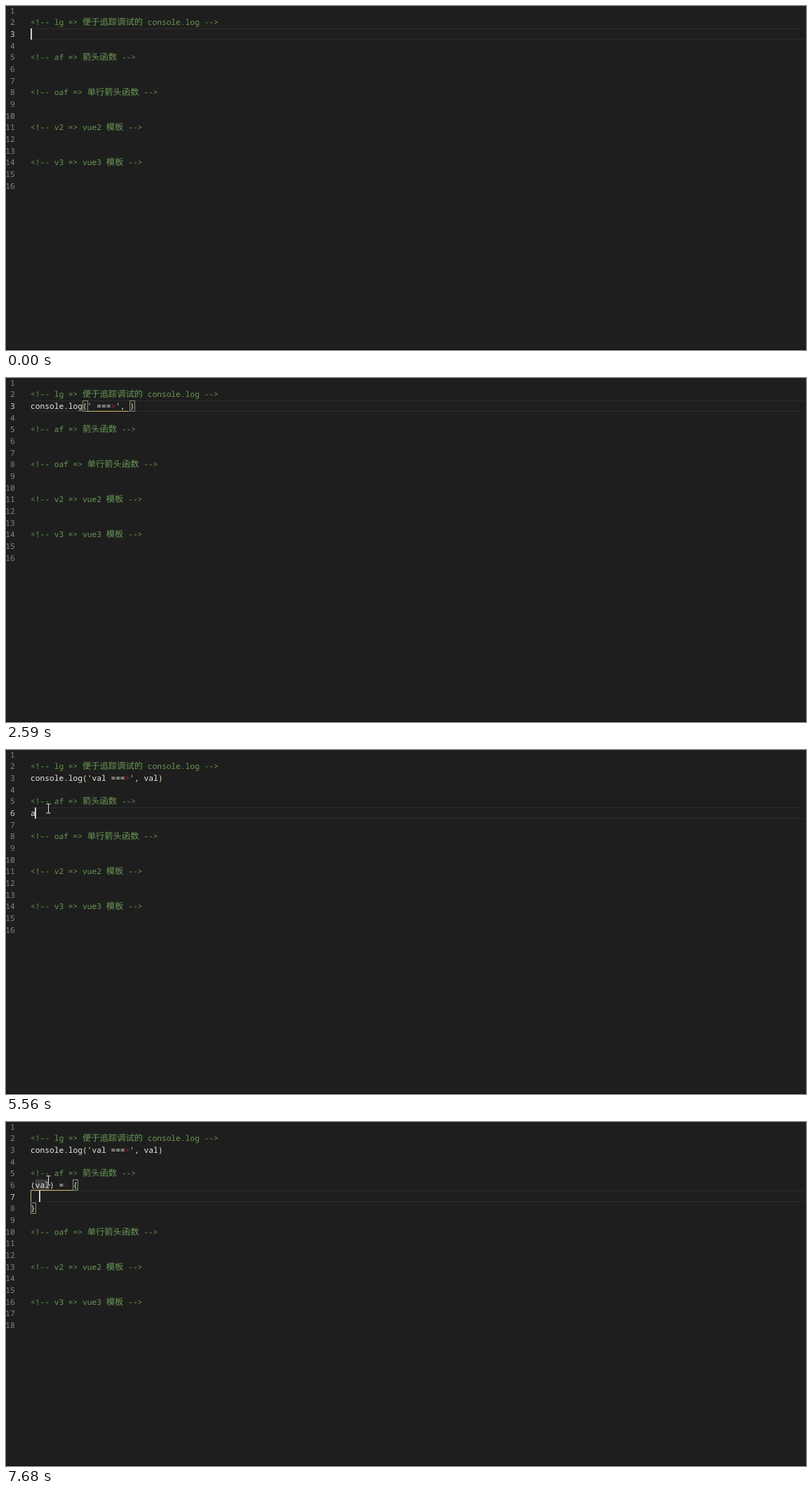
An HTML page with a canvas that plays this animation: 1140 by 491 pixels, repeating every 8 s.

```html
<!DOCTYPE html>
<html lang="zh">
<head>
<meta charset="utf-8">
<title>Editor snippets</title>
<style>
  html, body { margin: 0; height: 100%; overflow: hidden; background: #1e1e1e; }
  canvas { display: block; }
</style>
</head>
<body>
<canvas width="1140" height="491"></canvas>
<script>
const ctx = document.querySelector('canvas').getContext('2d');
ctx.textRendering = 'geometricPrecision';

const LOOP = 8000;
const LEFT = 35, CELL = 6.73, WIDE = 12.28, ROW = 16.667;
const POPUP_W = 379, DETAILS_W = 291;
const MONO = '"Noto Sans Mono", "DejaVu Sans Mono", monospace';
const HAN = '"Noto Sans CJK SC", "Noto Sans CJK", sans-serif';
const COLOR = {
  back: '#1e1e1e', text: '#ececE4', comment: '#6a9955', number: '#858585', active: '#d0d0d0',
  bracket: '#ece6b4', guide: '#c9b766', panel: '#252526', edge: '#454545',
  selected: '#04395e', match: '#2aaaff', hint: '#a4a4a4'
};

const lineTop = line => Math.floor(line * ROW - 18);
const baseline = line => Math.round(line * ROW - 6);
const colX = col => LEFT + col * CELL;

const logCall = word => `console.log('${word} ===>', ${word})`;
const arrow = word => [`(${word}) => {`, '', '}'];

const logList = { items: ['lg', 'leg', 'legend'], hint: 'Console log', typed: 'lg' };
const logDetails = {
  head: ['便于追踪调试的 console.log (全局用户代码', '片段)'],
  code: ["console.log(' ===>', )"]
};
const arrowDetails = { head: ['箭头函数 (全局用户代码片段)'], code: ['() => {', '', '}'] };
const longList = (words, typed, hint) => ({ items: words.split(' '), typed, hint });

// Each step changes part of the editor state from its time on.
const steps = [
  [0, { log: '', arrow: [''], line: 3, carets: [[3, 0]], on: true, boxes: [],
        guide: null, popup: null, details: null, word: null, click: false }],
  [230, { on: false }],
  [670, { on: true }],
  [1160, { log: 'l', carets: [[3, 1]] }],
  [1250, { log: 'lg', carets: [[3, 2]] }],
  [1340, { popup: longList('lg label legend li link leg lang list loop low last long', 'l', 'Console log') }],
  [1430, { popup: logList }],
  [1520, { details: logDetails }],
  [1940, { on: false }],
  [2090, { log: logCall(''), carets: [[3, 13], [3, 21]], on: true, popup: null, details: null }],
  [2150, { boxes: [[3, 11], [3, 21]], guide: [3, 12, 21] }],
  [2590, { on: false }],
  [2660, { log: logCall('v'), carets: [[3, 14], [3, 23]], on: true, boxes: [[3, 11], [3, 23]], guide: [3, 12, 23] }],
  [2720, { log: logCall('va'), carets: [[3, 15], [3, 25]], boxes: [[3, 11], [3, 25]], guide: [3, 12, 25] }],
  [2780, { popup: longList('var video v2 v3 vue2 vue3', 'v') }],
  [2840, { log: logCall('val'), carets: [[3, 16], [3, 27]], boxes: [[3, 11], [3, 27]], guide: [3, 12, 27], popup: null }],
  [3190, { carets: [[3, 28]], guide: null }],
  [3630, { on: false }],
  [4130, { on: true }],
  [4630, { on: false }],
  [5010, { line: 6, carets: [[6, 0]], on: true, click: true }],
  [5070, { boxes: [] }],
  [5220, { click: false }],
  [5490, { arrow: ['a'], carets: [[6, 1]] }],
  [5580, { arrow: ['af'], carets: [[6, 2]] }],
  [5660, { popup: longList('af a abbr address area article aside audio alt app async auto', 'a', 'Arrow function') }],
  [5750, { popup: { items: ['af'], hint: 'Arrow function', typed: 'af' }, details: arrowDetails }],
  [6170, { on: false }],
  [6430, { arrow: arrow(''), carets: [[6, 1]], on: true, boxes: [[6, 0], [6, 1]], popup: null, details: null }],
  [6910, { on: false }],
  [7230, { arrow: arrow('va'), carets: [[6, 3]], on: true, boxes: [[6, 0], [6, 3]] }],
  [7310, { arrow: arrow('val'), carets: [[6, 4]], boxes: [[6, 0], [6, 4]],
           popup: longList('val var video v2 v3 vue2 vue3', 'v') }],
  [7400, { popup: longList('val var', 'va') }],
  [7600, { line: 7, carets: [[7, 2]], boxes: [], popup: null, word: [6, 1, 4] }],
  [7680, { boxes: [[6, 9], [8, 0]], guide: [6, 0, 9, 7] }]
];

function rect(x, y, w, h, color) {
  ctx.fillStyle = color;
  ctx.fillRect(x, y, w, h);
}

function frame(x, y, w, h, fill, edge) {
  rect(x, y, w, h, fill);
  ctx.strokeStyle = edge;
  ctx.lineWidth = 1;
  ctx.strokeRect(x + .5, y + .5, w - 1, h - 1);
}

// Draws on the monospace grid; color is a string or a function of (char, index).
function drawText(text, x, y, color, scale = 1, weight = 500) {
  [...text].forEach((char, i) => {
    const wide = char > '\u2e80';
    ctx.font = `${wide ? 300 : weight} ${(wide ? 12.3 : 11.2) * scale}px ${wide ? HAN : MONO}`;
    ctx.fillStyle = typeof color === 'string' ? color : color(char, i);
    ctx.fillText(char, x, y);
    x += (wide ? WIDE : CELL) * scale;
  });
}

const codeColor = arrowColor => char =>
  '(){}'.includes(char) ? COLOR.bracket : char === '>' ? arrowColor : COLOR.text;

function drawLines(state) {
  const note = text => `<!-- ${text} -->`;
  const lines = ['', note('lg => 便于追踪调试的 console.log'), state.log, '',
    note('af => 箭头函数'), ...state.arrow, '', note('oaf => 单行箭头函数'), '', '',
    note('v2 => vue2 模板'), '', '', note('v3 => vue3 模板'), '', ''];
  lines.forEach((text, i) => {
    const line = i + 1, y = baseline(line), label = String(line);
    drawText(label, 12.8 - label.length * CELL, y, line === state.line ? COLOR.active : COLOR.number);
    const color = text.startsWith('<!--') ? COLOR.comment : codeColor(line === 3 ? '#c02020' : '#4a2020');
    drawText(text, LEFT, y, color);
  });
}

function drawMarks({ line, boxes, word, guide }) {
  const top = lineTop(line);
  rect(37, top, 1101, 1, '#2c2c2c');
  rect(37, top + 15, 1101, 1, '#2c2c2c');
  if (word) {
    const [row, from, to] = word;
    rect(colX(from), lineTop(row), (to - from) * CELL, 15, '#3b3d40');
  }
  for (const [row, col] of boxes)
    frame(Math.floor(colX(col)), lineTop(row), 8, 16, '#1c261c', '#888888');
  if (guide) {
    const [row, from, to, last] = guide;
    const y = lineTop(row) + 15;
    rect(Math.floor(colX(from)), y, Math.floor((to - from) * CELL), 1, COLOR.guide);
    if (last) rect(LEFT, y + 1, 1, lineTop(last) + 15 - y, COLOR.guide);
  }
}

function drawPopup({ popup, details, carets }) {
  const [line, col] = carets[0];
  const x = Math.floor(colX(col)), y = lineTop(line) + 16;
  frame(x, y, POPUP_W, Math.round(popup.items.length * ROW + 3.6), COLOR.panel, COLOR.edge);
  rect(x + 1, y + 1, POPUP_W - 2, 17, COLOR.selected);
  popup.items.forEach((item, i) => {
    const base = Math.round(y + 13.3 + i * ROW);
    ctx.strokeStyle = COLOR.text;
    ctx.lineWidth = 1;
    ctx.strokeRect(x + 4.5, base - 8.5, 11, 10);
    const matched = (char, at) => popup.typed.includes(char) && item.indexOf(char) === at;
    drawText(item, x + 21, base, (char, at) => matched(char, at) ? COLOR.match : COLOR.text, 1, 600);
  });
  if (popup.hint) {
    const scale = .865;
    drawText(popup.hint, x + 370 - popup.hint.length * CELL * scale, y + 13, '#c4cdd4', scale, 600);
  }
  if (details) drawDetails(details, x + POPUP_W - 1, y);
}

function drawDetails({ head, code }, x, y) {
  const rows = [...head, '', ...code];
  frame(x, y, DETAILS_W, Math.round(rows.length * 16.3 + 8), COLOR.panel, COLOR.edge);
  rows.forEach((text, i) =>
    drawText(text, x + 5.5, Math.round(y + 16 + i * 16.3), i < head.length ? COLOR.hint : COLOR.text));
  ctx.strokeStyle = COLOR.text;
  ctx.beginPath();
  for (const dir of [-1, 1]) {
    ctx.moveTo(x + 280 - 3.5, y + 12.5 - 3.5 * dir);
    ctx.lineTo(x + 280 + 3.5, y + 12.5 + 3.5 * dir);
  }
  ctx.stroke();
}

function drawMouse(time, click) {
  if (time < 4390) return;
  const part = Math.min(1, (time - 4390) / 410);
  const ease = 1 - (1 - part) ** 2;
  const x = Math.floor(4 + 56 * ease) + .5, y = Math.round(103 - 20 * ease) + .5;
  if (click) {
    ctx.fillStyle = '#8f8a12';
    ctx.beginPath();
    ctx.arc(x, y, 10.5, 0, Math.PI * 2);
    ctx.fill();
  }
  ctx.beginPath();
  ctx.moveTo(x, y - 6); ctx.lineTo(x, y + 6);
  for (const end of [-6.5, 6.5]) {
    ctx.moveTo(x - 3, y + end); ctx.lineTo(x + 3, y + end);
  }
  for (const [color, width] of [['#1e1e1e', 2.5], ['#e4e4e4', 1]]) {
    ctx.strokeStyle = color;
    ctx.lineWidth = width;
    ctx.stroke();
  }
}

function draw(now) {
  const time = now % LOOP;
  const state = Object.assign({}, ...steps.filter(([at]) => at <= time).map(([, change]) => change));
  rect(0, 0, 1140, 491, COLOR.back);
  rect(0, 490, 1140, 1, '#111111');
  drawMarks(state);
  drawLines(state);
  if (state.on)
    for (const [line, col] of state.carets)
      rect(Math.max(LEFT, Math.floor(colX(col) - .5)), lineTop(line), 2, 16, '#d0d0cc');
  if (state.popup) drawPopup(state);
  drawMouse(time, state.click);
}

const start = performance.now();
function tick() {
  draw(performance.now() - start);
  requestAnimationFrame(tick);
}
tick();
</script>
</body>
</html>
```
